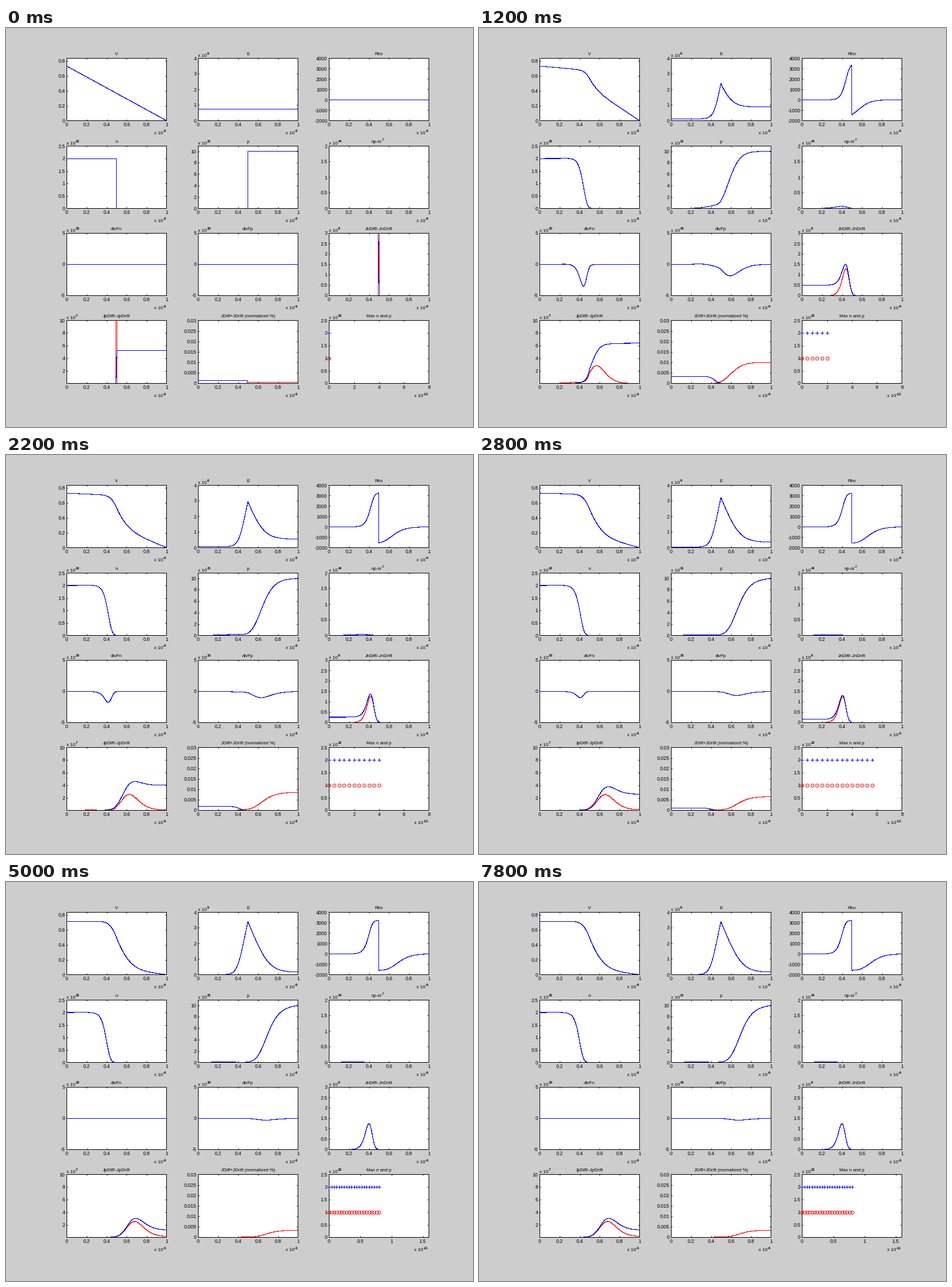
Write a matplotlib script that moves like this. It is 810x691 px and loops after 8 s.

```python
import numpy as np
import matplotlib.pyplot as plt
from matplotlib.animation import FuncAnimation

W, H, DPI = 810, 691, 100
PX = 72 / DPI
HAIR = 0.1 * PX      # drawn without antialiasing, gives one-pixel strokes
MID = 0.45           # just under a pixel centre, so snapping keeps the pixel
BLUE, RED = "#0000ff", "#ff0000"

plt.rcParams.update({
    "font.family": "Liberation Sans", "path.simplify": False,
    "axes.linewidth": PX,
})

# --- pn junction: 1-D drift-diffusion, SI units ---
Q, EPS = 1.6e-19, 1.04e-10
MU_N, MU_P, D_N, D_P = 0.135, 0.045, 0.0036, 0.0036
ND, NA, NI = 2e22, 1e22, 1.5e16
N, LENGTH = 201, 1e-6
DX = LENGTH / (N - 1)
PLOT_DT, SUBSTEPS, LAST = 0.4e-12, 200, 20
V_START, V_END = 0.73, 0.714

x = np.linspace(0, 1, N)
xm = (x[1:] + x[:-1]) / 2
donor = np.arange(N) < N // 2
doping = np.where(donor, ND, -NA)


def field(n, p, bias):
    rho = Q * (p - n + doping)
    e = np.concatenate(([0], np.cumsum(rho[1:-1]) * DX / EPS))
    return e + bias / LENGTH - e.mean(), rho


def currents(n, p, e):
    n_drift = Q * MU_N * (n[1:] + n[:-1]) / 2 * e
    p_drift = Q * MU_P * (p[1:] + p[:-1]) / 2 * e
    n_diff = -Q * D_N * np.diff(n) / DX
    p_diff = Q * D_P * np.diff(p) / DX
    return n_drift, n_diff, p_drift, p_diff


def rates(n, p, e):
    nd, nf, pd, pf = currents(n, p, e)
    return np.diff(nd - nf) / (Q * DX), -np.diff(pd - pf) / (Q * DX)


def simulate():
    n = np.where(donor, ND, NI**2 / NA)
    p = np.where(donor, NI**2 / ND, NA)
    states = [(n.copy(), p.copy())]
    dt = PLOT_DT / SUBSTEPS
    for _ in range(LAST):
        for _ in range(SUBSTEPS):
            dn, dp = rates(n, p, field(n, p, V_START)[0])
            n[1:-1] += dn * dt
            p[1:-1] += dp * dt
        states.append((n.copy(), p.copy()))
    return states


STATES = simulate()
N_MAX = np.array([s[0].max() for s in STATES]) / 1e22
P_MAX = np.array([s[1].max() for s in STATES]) / 1e22

# --- panels ---
fig = plt.figure(figsize=(W / DPI, H / DPI), dpi=DPI, facecolor="#cdcdcd")


def label(px, py, s, size=8.6, **kw):
    return fig.text(px / W, 1 - py / H, s, fontsize=size * PX,
                    va="baseline", **kw)


def power(px, py, exp):
    return [label(px, py, "x 10", 8.2),
            label(px + 15.5, py - 3.5, str(exp), 6.2, weight="bold")]


def x_labels(left, bottom, ticks, span, exp):
    made = [label(left + 0.5 + 173 * t / span, bottom + 10, f"{t:g}",
                  ha="center") for t in ticks]
    return made + power(left + (148 if exp < -9 else 152), bottom + 24, exp)


LEFTS, TOPS, BOTTOMS = (105, 333, 560), (52, 204, 355, 506), (160, 312, 463, 615)
UNIT = np.arange(6) / 5


def panel(k, title, lim, ticks, exp=None, skip=None):
    row, col = divmod(k, 3)
    left, top, bottom = LEFTS[col], TOPS[row], BOTTOMS[row]
    ax = fig.add_axes([(left + MID) / W, 1 - (bottom + MID) / H,
                       173 / W, (bottom - top) / H])
    ax.set(xlim=(0, 1), ylim=lim, xticks=UNIT, yticks=ticks)
    ax.tick_params(direction="in", length=2 * PX, width=PX, top=True,
                   right=True, labelbottom=False, labelleft=False)
    for t in ticks:
        if t != skip:
            y = bottom + 0.5 - (t - lim[0]) / (lim[1] - lim[0]) * (bottom - top)
            label(left - 2.5, y + 3, f"{t:g}", ha="right")
    if exp is not None:
        power(left, top - 2, exp)
    if title == "np-ni":
        label(left + 92, top - 9, "2", 6.5)
        label(left + 82, top - 5, title, 8, ha="center")
    else:
        label(left + 86.5, top - 5, title, 7.9, ha="center")
    if k < 11:
        x_labels(left, bottom, UNIT, 1, -6)
    return ax


def curve(ax, color=BLUE, z=3):
    return ax.plot([], [], color=color, lw=HAIR, antialiased=False,
                   snap=False, zorder=z)[0]


def pair(ax):
    return curve(ax, RED), curve(ax, BLUE)


half = np.arange(6) / 2
even = np.arange(0, 11, 2)
v_line = curve(panel(0, "V", (0, 0.835), np.arange(5) / 5))
e_line = curve(panel(1, "E", (0, 4), range(5), 6))
rho_line = curve(panel(2, "Rho", (-2000, 4000), range(-2000, 4001, 1000)))
n_line = curve(panel(3, "n", (0, 2.5), half, 22), z=2.2)
p_line = curve(panel(4, "p", (0, 10.93), even, 21), z=2.2)
np_line = curve(panel(5, "np-ni", (0, 2), half[:5], 44))
fn_line = curve(panel(6, "divFn", (-5, 5), (-5, 0, 5), 33))
fp_line = curve(panel(7, "divFp", (-5, 5), (-5, 0, 5), 33))
jn_diff, jn_drift = pair(panel(8, "JnDiff/-JnDrift", (0, 3), np.arange(7) / 2, 8))
jp_diff, jp_drift = pair(panel(9, "JpDiff/-JpDrift", (0, 10), even, 7, skip=0))
p_sum, n_sum = pair(panel(10, "JDiff+JDrift (normalized %)", (0, 0.03),
                          np.arange(7) * 5 / 1000))
max_ax = panel(11, "Max n and p", (0, 2.5), half, 22)


def dots(marker, color, size):
    return max_ax.plot([], [], ls="", marker=marker, ms=size * PX, mec=color,
                       mfc="none", mew=PX, clip_on=False, zorder=4)[0]


n_dots, p_dots = dots("+", BLUE, 6), dots("o", RED, 5.5)
short_scale = x_labels(560, 615, range(0, 9, 2), 8, -12)
long_scale = x_labels(560, 615, half[:4], 1.6, -11)

# --- timing: when each simulation step appears, in ms ---
STARTS = [0, 200, 600, 800, 1200, 1400, 1800, 2000, 2200, 2400,
          2800, 3200, 3600, 3800, 4000, 4200]
STEPS = [0, 1, 2, 4, 5, 7, 8, 9, 10, 12, 14, 16, 17, 18, 19, 20]
TICK, FRAMES = 200, 40


def update(i):
    step = STEPS[np.searchsorted(STARTS, i * TICK, side="right") - 1]
    n, p = STATES[step]
    e, rho = field(n, p, V_END if step == LAST else V_START)
    nd, nf, pd, pf = currents(n, p, e)
    dn, dp = rates(n, p, e)
    if step == 0:
        dn, dp = dn * 0, dp * 0
    sum_n = 0.01 * (nd - nf) / max(nd.max(), nf.max())
    sum_p = 0.01 * (pd - pf) / max(pd.max(), pf.max())

    v = np.concatenate((np.cumsum(e[::-1])[::-1] * DX, [0]))
    v_line.set_data(x, v)
    e_line.set_data(xm, e / 1e6)
    rho_line.set_data(x, rho)
    n_line.set_data(x, n / 1e22)
    p_line.set_data(x, p / 1e21)
    np_line.set_data(x, (n * p - NI**2) / 1e44)
    fn_line.set_data(x[1:-1], dn / 1e33)
    fp_line.set_data(x[1:-1], dp / 1e33)
    jn_drift.set_data(xm, nd / 1e8)
    jn_diff.set_data(xm, nf / 1e8)
    jp_drift.set_data(xm, pd / 1e7)
    jp_diff.set_data(xm, pf / 1e7)
    n_sum.set_data(xm, sum_n)
    p_sum.set_data(xm, sum_p)

    wide = step == LAST
    max_ax.set_xlim(0, 16 if wide else 8)
    max_ax.set_xticks([0, 5, 10, 15] if wide else range(0, 9, 2))
    for t in short_scale:
        t.set_visible(not wide)
    for t in long_scale:
        t.set_visible(wide)
    times = np.arange(step + 1) * 0.4
    n_dots.set_data(times, N_MAX[:step + 1])
    p_dots.set_data(times, P_MAX[:step + 1])
    return []


anim = FuncAnimation(fig, update, frames=FRAMES, interval=TICK, repeat=True,
                     repeat_delay=0, init_func=lambda: update(0), blit=False)
plt.show()
```
